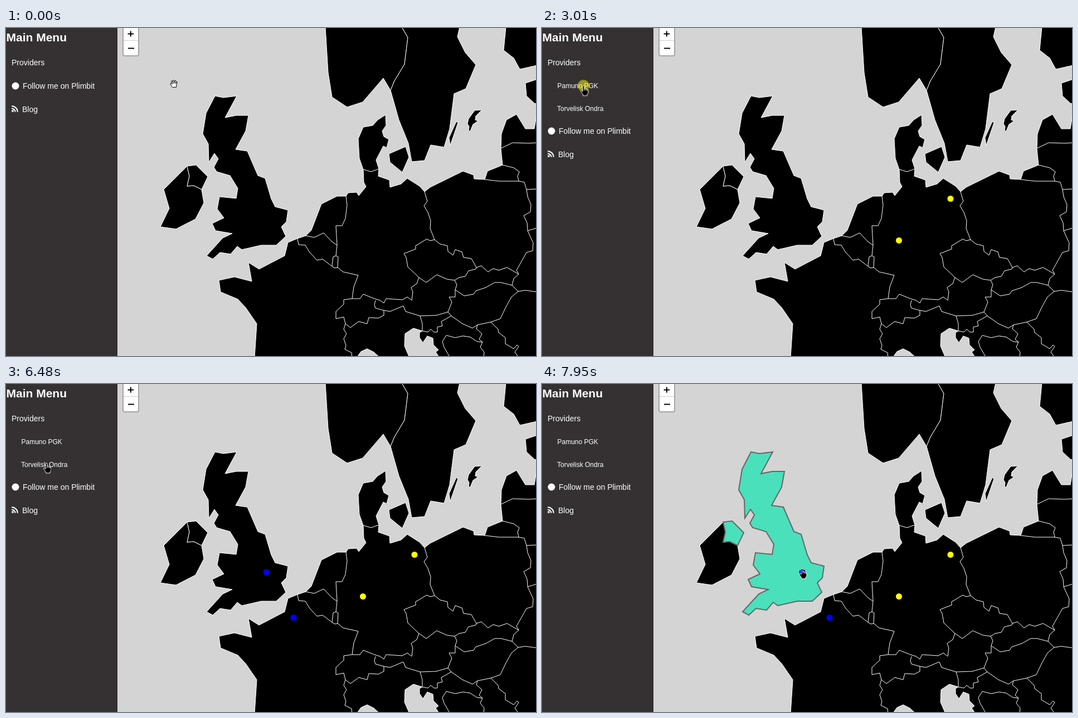
An HTML page for the animation above (8 s loop, 951 by 589 pixels).

```html
<!DOCTYPE html>
<html lang="en">
<head>
<meta charset="utf-8">
<title>Provider map</title>
<style>
html, body { margin: 0; width: 100%; height: 100%; overflow: hidden; background: #d4d4d4; }
svg { display: block; width: 951px; height: 589px; }
text { font: 14px "Liberation Sans", Arial, sans-serif; fill: #fff; }
.title { font-size: 21px; font-weight: bold; }
.sub text { font-size: 12px; }
.land { fill: #000; stroke: #fff; stroke-linejoin: round; }
.line { fill: none; stroke: #fff; stroke-linejoin: round; }
.sea { fill: #d4d4d4; stroke: #fff; }
.hover path { fill: #4ae0bb; stroke: #666; stroke-width: 2; stroke-linejoin: round; }

.sub, .rest, .aws, .blue, .hover, .click, .grab, .point { animation: 8s step-end infinite; }
.sub { animation-name: open; }
.rest { animation-name: slide; }
.yellow { animation: yellow 8s step-end infinite; }
.blue { animation-name: blue; }
.hover { animation-name: hover; }
.click { animation-name: click; }
.grab { animation-name: grab; }
.point { animation-name: point; }
.cursor { animation: move 8s steps(1) infinite; }

@keyframes open { 0% { opacity: 0 } 11.75%, 100% { opacity: 1 } }
@keyframes slide { 0% { transform: none } 11.75%, 100% { transform: translateY(81px) } }
@keyframes yellow {
  0%, 38.5% { opacity: 0 }
  25.125%, 47.75%, 100% { opacity: 1 }
}
@keyframes blue {
  0%, 70.25% { opacity: 0 }
  59.375%, 78.5%, 100% { opacity: 1 }
}
@keyframes hover { 0% { opacity: 0 } 92.75%, 100% { opacity: 1 } }
@keyframes click {
  0%, 11.75%, 25.125%, 38.5%, 47.75%, 59.375%, 70.25%, 78.5%, 100% { opacity: 0 }
  10.875%, 24.25%, 37.625%, 46%, 57.75%, 68.625%, 76.875% { opacity: 1 }
}
@keyframes grab {
  0%, 89.4% { opacity: 1 }
  3.375%, 91.875%, 100% { opacity: 0 }
}
@keyframes point {
  0%, 89.4% { opacity: 0 }
  3.375%, 91.875%, 100% { opacity: 1 }
}
@keyframes move {
  0% { transform: translate(301px, 100px) }
  .875% { transform: translate(301px, 100px); animation-timing-function: steps(4, start) }
  4.208% { transform: translate(170px, 84px); animation-timing-function: steps(3, start) }
  6.75% { transform: translate(90px, 69px); animation-timing-function: steps(4, start) }
  10.1% { transform: translate(62.5px, 62.5px) }
  15.125% { transform: translate(62.5px, 62.5px); animation-timing-function: steps(6, start) }
  20.075% { transform: translate(74.5px, 103.5px) }
  51% { transform: translate(75.5px, 111px) }
  52.75% { transform: translate(75.5px, 111px); animation-timing-function: steps(4, start) }
  56.1% { transform: translate(72.5px, 141.5px) }
  81% { transform: translate(72.5px, 142px) }
  81.875% { transform: translate(72.5px, 142.5px) }
  87.75% { transform: translate(72.5px, 142.5px); animation-timing-function: steps(4, start) }
  91% { transform: translate(297px, 168px); animation-timing-function: steps(2, start) }
  92.75% { transform: translate(421.5px, 224.5px); animation-timing-function: steps(7, start) }
  98.625% { transform: translate(465px, 319.5px); animation-timing-function: steps(2, start) }
  100% { transform: translate(466.5px, 331.5px) }
}
</style>
</head>
<body>
<svg viewBox="0 0 951 589">
  <defs>
    <path id="britain" d="M375 122 390 125 414 122 393 161 413 157 435 157 430 185 412 218 433 221 452 265 465 270 476 307 483 321 506 327 503 348 494 357 502 374 485 390 458 390 423 398 415 392 403 406 384 403 371 415 360 409 389 377 406 369 376 364 370 351 391 341 379 325 383 303 413 306 416 288 402 265 378 258 373 250 381 235 374 225 364 241 363 208 353 190 359 153Z"/>
    <path id="ulster" d="M325 248 341 246 362 267 351 290 337 283 325 284 329 266Z"/>
  </defs>

  <rect width="951" height="589" fill="#d4d4d4"/>

  <g class="land">
    <path d="M325 248 329 266 325 284 337 283 351 290 355 314 340 343 305 361 277 357 293 324 283 290Z"/>
    <use href="#britain"/>
    <use href="#ulster"/>
    <!-- Nordic countries and islands -->
    <path d="M573 -2 578 80 585 124 612 142 640 133 677 90 690 112 697 95 715 65 721 17 710 -2Z"/>
    <path d="M710 -2 721 17 715 65 697 95 690 112 705 165 722 207 728 240 751 238 762 210 786 214 796 181 804 118 825 109 843 66 824 44 810 16 814 -2Z"/>
    <path d="M897 -2 893 40 911 54 922 74 953 67 953 -2Z"/>
    <path d="M953 92 932 99 934 122 949 136 953 134Z"/>
    <path d="M808 168 811 170 797 211 795 197Z"/>
    <path d="M841 148 854 147 843 158 842 165 847 167 838 173 833 185 830 185 831 177 828 172 830 163Z"/>
    <path d="M687 226 717 213 723 232 711 259 689 241Z"/>
    <!-- Mainland -->
    <path d="M446 592 450 531 430 502 416 487 385 474 382 453 410 447 441 455 435 421 454 433 500 409 506 385 523 378 538 373 548 363 566 316 594 302 610 302 614 296 629 295 633 301 646 285 642 277 641 254 634 234 632 199 641 178 658 175 667 165 681 156 682 175 675 185 678 195 687 200 683 215 677 212 664 237 669 253 668 266 688 273 689 286 709 280 720 270 742 284 751 294 761 286 820 257 839 264 840 271 859 272 864 257 891 246 888 217 889 190 898 165 916 155 932 181 948 181 953 150 953 592Z"/>
  </g>

  <g class="sea">
    <path d="M629 592 637 581 648 576 660 582 671 592Z"/>
    <path d="M724 592 715 571 716 549 731 539 747 544 742 547 742 556 748 565 756 553 766 557 767 569 776 578 771 582 778 592Z"/>
  </g>

  <g class="line">
    <!-- Low countries, France -->
    <path d="M641 254 655 258 669 253M610 302 612 318 609 342 603 355 592 355 594 390"/>
    <path d="M538 373 553 376 570 368 585 384 594 390 592 409 587 411 585 428 590 431 595 430 596 411 592 409M523 378 525 389 537 390 545 403 558 417 568 415 585 428"/>
    <path d="M595 430 605 438 632 444 624 465 621 486"/>
    <!-- Alps -->
    <path d="M661 486 641 478 635 486 621 486 606 488 606 496 592 509 592 522 606 519 609 531 618 538 633 527 648 531 651 520 668 521 678 516 678 507 663 503 661 497 663 489"/>
    <path d="M609 531 606 541 611 549 606 558 610 570 608 577 620 583 621 592"/>
    <path d="M661 486 671 489 678 494 682 486 711 488 720 483 728 489 730 474 727 466 737 459 741 448"/>
    <path d="M678 507 689 509 713 499 717 509 743 517 772 516 793 510 800 492 795 483 806 483 806 470 809 461 805 453"/>
    <!-- Czechia, Poland -->
    <path d="M751 294 756 311 750 319 757 331 762 346 761 360 769 380 761 382 755 379 735 391 735 397 714 405 718 412 721 429 741 448 754 457 773 443 791 451 805 453 813 448 824 446 830 436 843 433 844 430"/>
    <path d="M769 380 779 388 792 391 793 401 802 408 806 398 818 402 821 412 835 414 844 430 853 427 865 438 874 432 884 435 899 430 920 442"/>
    <path d="M859 272 884 275 920 275 918 266 921 258 911 251 891 246M888 216 909 206 938 207 953 206"/>
    <path d="M920 275 930 277 934 290 936 303 942 317 941 330 929 337 935 350 936 364 946 386 945 400 934 403 916 435 920 442M934 290 953 289M936 364 953 359"/>
    <!-- Danube and Balkans -->
    <path d="M806 470 822 481 839 478 843 472 861 466 877 457 888 457 908 462M920 442 911 450 908 462 919 473 932 471 953 474M919 473 907 483 897 501 887 522 870 528 846 533 837 539 819 531 799 517 793 510"/>
    <path d="M743 517 747 531 747 544 757 546 762 541 768 546 774 546 774 537 783 535 781 527 799 517"/>
    <path d="M846 533 844 540 854 549 849 559 855 564 851 573 858 582 857 592M855 564 845 563 833 555 820 553 806 556 790 552 783 563 786 573 797 592"/>
    <path d="M870 528 883 541 884 547 896 556 896 567 911 576 917 569 920 572 913 582 920 592"/>
  </g>

  <g class="hover">
    <use href="#britain" style="fill:#4ae0bb;stroke:#666;stroke-width:2"/>
    <use href="#ulster" style="fill:#4ae0bb;stroke:#666;stroke-width:2"/>
  </g>

  <g class="yellow" fill="#ff0">
    <circle cx="733" cy="306.5" r="5.5"/>
    <circle cx="640.5" cy="381.5" r="5.5"/>
  </g>
  <g class="blue" fill="#00f">
    <circle cx="467" cy="338" r="5.5"/>
    <circle cx="516" cy="419.5" r="5.5"/>
  </g>

  <!-- Zoom control -->
  <rect x="209" y="-10" width="30" height="61" rx="4" fill="#000" fill-opacity=".22"/>
  <rect x="211" y="-10" width="26" height="59" rx="2" fill="#fff"/>
  <path d="M211 22.5H237" stroke="#ccc"/>
  <path d="M218.5 10.5H229M223.75 5.5V15.5M219 36.5H230" stroke="#000" stroke-width="2"/>

  <!-- Sidebar -->
  <rect width="200" height="589" fill="#353132"/>
  <text class="title" x=".5" y="24">Main Menu</text>
  <text x="10" y="67">Providers</text>
  <g class="sub">
    <text x="27.5" y="108">Pamuno PGK</text>
    <text x="27" y="148.5">Torvelisk Ondra</text>
  </g>
  <g class="rest">
    <circle cx="17" cy="104" r="6.5" fill="#fff"/>
    <text x="30" y="109">Follow me on Plimbit</text>
    <circle cx="12" cy="149" r="1.9" fill="#fff"/>
    <path d="M10.2 144.4a6.4 6.4 0 0 1 6.4 6.4M10.2 140.2a10.6 10.6 0 0 1 10.6 10.6" fill="none" stroke="#fff" stroke-width="2"/>
    <text x="29" y="150.500">Blog</text>
  </g>

  <g class="cursor">
    <circle class="click" r="10.5" fill="#ff0" fill-opacity=".5"/>
    <g class="grab" fill="#fff" stroke="#000" stroke-linejoin="round">
      <path d="M-2.500 6.500 -6 1Q-6.500-1-4.500-.5L-3 1-4.500-4Q-4-6-2.500-5L-1.500-2V-5.500Q0-7.500 1-5.500V-2L2-5.500Q3.500-6.500 4-4.500L3.500-1 4.500-3Q6.500-4 6.300-2L4.500 3V6.500Z"/>
      <path d="M-1.500-2V0M1-2V0M3.500-1V0" fill="none"/>
    </g>
    <g class="point" stroke="#fff" stroke-linejoin="round">
      <path d="M-1.500 1.500Q-1.500 0 0 0 1.500 0 1.500 1.500V5.500Q3.500 4.800 4.300 6.300 6 5.700 6.800 7.200 8.500 7 8.500 9V13L6.500 16V18H-1V16L-4.500 11Q-5.300 8.500-3.500 8.500L-1.500 10.500Z"/>
      <path d="M1.500 5V9M4.300 6.300V9M6.800 7.200V9.500" fill="none"/>
    </g>
  </g>
</svg>
</body>
</html>
```
